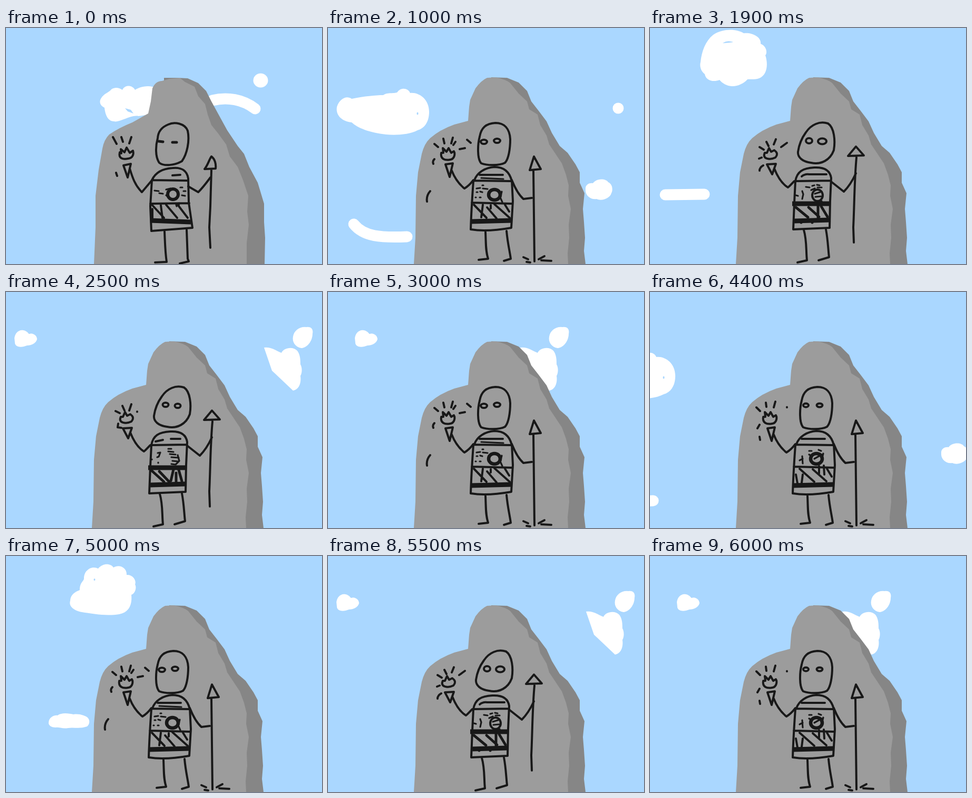
These frames come from a looping animation (600x450 px, 6.1 s). An HTML page:

```html
<!DOCTYPE html>
<html lang="en">
<head>
<meta charset="utf-8">
<title>Figure on a rock</title>
<style>
html, body { margin: 0; width: 100%; height: 100%; overflow: hidden; background: #aad7ff; }
svg { display: block; width: 600px; height: 450px; }
.cloud path, .cloud ellipse { fill: #fff; }
.cloud .line { fill: none; stroke: #fff; stroke-width: 21; stroke-linecap: round; }
.cloud .gap { fill: #aad7ff; stroke: none; }
.cloud .slit { fill: none; stroke: #aad7ff; stroke-width: 2.5; stroke-linecap: round; }
.light { fill: #9c9c9c; }
.dark { fill: #868686; }
.ink { fill: none; stroke: #181818; stroke-width: 4; stroke-linecap: round; stroke-linejoin: round; }
.thin { stroke-width: 3.2; }
.bar { stroke-width: 9; stroke-linecap: butt; }
.cloud, .rock, .pose, .detail { display: none; }
.on { display: inline; }
</style>
</head>
<body>
<svg viewBox="0 0 600 450">
  <rect width="600" height="450" fill="#aad7ff"/>

  <g class="cloud" id="near">
    <g class="l">
      <path d="M180 135C186 124 196 123 200 117C208 112 214 114 221 118C225 108 240 108 245 118C255 111 275 108 285 115L300 160L252 168C235 165 217 181 205 178C192 178 188 162 187 152C178 148 177 140 180 135Z"/>
      <path class="gap" d="M226 153L237 156L242 163L231 159Z"/>
    </g>
    <g class="r">
      <path class="line" d="M392 138C420 131 450 136 473 154"/>
      <ellipse cx="483.500" cy="100" rx="14" ry="13.500"/>
    </g>
  </g>

  <g class="cloud" id="spread">
    <g class="l">
      <path d="M58 155C62 138 78 134 88 129C95 119 110 118 116 130C128 134 140 133 147 130C155 112 178 110 187 130C190 138 190 136 200 141C214 150 218 170 214 178C205 195 175 198 150 203C120 204 100 202 85 198C62 190 54 172 58 155Z"/>
      <path class="slit" d="M100 179Q120 183 140 183M137 159L148 158M166 160L175 154"/>
      <path class="line" d="M151 397L180 394"/>
    </g>
    <g class="r">
      <path class="line" d="M568 110C552 113 540 120 536 131C538 140 546 148 552 153"/>
      <path d="M475 300C485 290 500 290 508 295C514 304 510 318 500 326C492 331 480 330 475 325Z"/>
    </g>
  </g>

  <g class="cloud" id="wide">
    <g class="l">
      <path d="M17 150C22 135 35 128 45 135C70 130 90 128 105 128C112 122 128 126 132 122C138 113 152 114 156 124C172 122 192 135 192 160C192 180 182 192 170 195C155 203 130 205 110 203C80 200 55 190 45 180C25 178 14 165 17 150Z"/>
      <ellipse class="gap" cx="170" cy="163" rx="1.500" ry="2.500"/>
      <path class="line" d="M49 374C68 398 100 400 150 398"/>
    </g>
    <g class="r">
      <ellipse cx="551" cy="153" rx="10.500" ry="10.500"/>
      <path d="M489 308C488 298 497 295 503 296C510 286 528 287 532 294C541 298 541 310 538 315C536 324 520 331 510 326C498 328 488 318 489 308Z"/>
    </g>
  </g>

  <g class="cloud" id="high">
    <g class="l">
      <path d="M96 65C98 45 105 25 120 13C140 0 165 2 178 10C195 8 212 18 210 30C222 35 223 48 219 52C225 70 222 90 207 96C198 99 190 97 185 98C178 106 165 112 155 111C145 110 138 106 132 99C120 104 106 100 104 88C96 82 94 72 96 65Z"/>
      <path class="gap" d="M138 29C145 24 153 25 158 27L150 28Z"/>
      <path class="line" d="M29 318L103 317"/>
    </g>
    <g class="r"></g>
  </g>

  <g class="cloud" id="puffy">
    <g class="l">
      <path d="M122 85C123 72 133 68 140 65C140 50 148 48 148 43C148 25 165 18 175 24C185 12 200 15 204 22C215 15 230 22 229 36C242 35 248 48 245 54C249 62 244 72 238 74C240 95 232 108 215 111C190 115 165 110 150 108C132 106 118 98 122 85Z"/>
      <ellipse class="gap" cx="168" cy="45" rx="1.500" ry="2"/>
      <path d="M81 317C82 307 92 303 98 304C105 298 120 300 128 302C140 300 150 305 152 306C160 310 160 320 154 325C140 330 128 326 118 328C108 330 100 326 95 327C85 327 80 322 81 317Z"/>
    </g>
    <g class="r"></g>
  </g>

  <g class="cloud" id="small">
    <g class="l">
      <path d="M51 88C52 78 60 71 68 73C75 74 77 79 79 80C86 77 94 83 94 90C92 98 83 102 75 102C65 106 54 106 52 98Z"/>
    </g>
    <g class="r">
      <path d="M420 85C422 72 435 65 445 67C455 65 459 72 457 80C457 92 448 106 436 107C424 105 418 95 420 85Z"/>
      <path d="M365 106C378 104 388 112 398 116C402 106 420 103 428 112C434 120 434 130 434 138C438 145 437 155 434 160C436 172 432 186 420 188L380 150Z"/>
    </g>
  </g>

  <g class="rock" id="rockA">
    <path class="dark" d="M326 95L345 96L365 105L380 120L390 140L402 162L420 195L440 225L452 240L462 265L478 295L490 335L490 370L492 400L491 450H300V95Z"/>
    <path class="light" d="M167 450L170 380L170 320L176 270L183 230Q186 213 196 203Q215 190 240 180L270 163L275 140L278 115Q284 101 296 101L310 97L330 95L340 103L358 112L365 130L378 145L383 165L390 185L402 200L418 222L425 245L440 265L450 290L460 320L458 350L461 375L457 410L457 450Z"/>
  </g>
  <g class="rock" id="rockB">
    <path class="dark" d="M310 94L340 95L362 104L378 120L386 140L400 158L415 178L425 200L440 225L455 238L470 260L478 275L478 295L487 315L484 345L486 370L488 400L486 425L489 450H300Z"/>
    <path class="light" d="M163 450L166 400L167 320L171 275L178 240Q183 220 194 210Q212 194 240 184L266 177L268 150L270 137L280 115Q291 100 302 95L318 94Q338 98 346 105L362 125L378 140L382 155L398 165L403 185L415 205L420 222L432 240L444 258L452 280L457 300L456 320L461 345L457 375L458 400L455 430L456 450Z"/>
  </g>

  <g class="pose ink" id="start">
    <path d="M288 210C289 195 298 188 308 184C320 178 340 182 345 196C349 215 344 240 334 254C320 262 300 264 291 257C283 245 284 225 288 210Z"/>
    <path d="M290 216L298 217M316 218L324 218" stroke-width="5"/>
    <path d="M277 290C284 275 298 268 316 267C334 265 344 273 346 287L347 333L354 381L276 387L274 340L277 290L346 291M316 281L331 280M274 335L348 334"/>
    <path class="bar" d="M274 367L351 370"/>
    <path d="M277 337L300 362M294 338L297 362M278 345L278 362M304 337L325 362M326 337L345 362"/>
    <ellipse cx="317" cy="317" rx="10" ry="10" stroke-width="6"/>
    <path class="thin" d="M282 310L290 311M291 315L298 316M304 308L312 306M304 319L308 322M331 304L335 304M337 311L341 311M334 319L340 320M323 337L324 340M329 334L328 338"/>
    <path d="M279 288L258 313C245 300 240 285 235 268M346 302L365 313C375 303 382 293 388 285"/>
    <path d="M223 262L237 259L231 285Z"/>
    <path d="M216 237C213 249 222 251 232 249C241 248 243 240 241 234L235 238L229 228L225 237L218 231L219 239Z"/>
    <path d="M203 208L210 221M219 208L222 217M238 208L234 220M209 276L211 282"/>
    <path d="M390 270L388 340L386 380L388 419M390 245C386 250 384 260 377 269L398 268C399 260 397 250 390 245"/>
    <path d="M301 388C302 410 302 425 305 446L283 447M343 385L345 440L347 445L330 449"/>
  </g>

  <g class="pose ink" id="upright">
    <path d="M288 207C291 190 300 182 318 181C335 181 345 192 346 212C346 230 343 250 336 257C325 263 300 262 291 258C283 250 284 222 288 207Z"/>
    <path d="M278 290C283 276 298 266 316 265C334 265 345 275 349 292M276 292C274 320 272 350 271 384C295 388 325 385 348 381L351 330L349 290M277 291L349 292M273 333L350 335M288 280L332 280"/>
    <path class="bar" d="M272 369L349 367"/>
    <path d="M276 290C270 298 264 303 259 306C248 297 240 285 235 272M349 290C355 305 362 318 371 326L387 324"/>
    <path d="M223 260L237 258L231 284Z"/>
    <path d="M215 238C213 250 222 253 232 251C240 250 242 240 239 235L234 238L229 229L225 236L218 229L219 238Z"/>
    <path d="M390 272L392 445M391 245L383 271L404 269Z"/>
    <path d="M371 437L380 441M377 446L384 447M400 441L411 435M405 443L424 444"/>
    <path d="M299 389C300 410 299 425 304 440L286 442M339 387C341 410 345 425 347 440L334 444"/>
    <ellipse cx="316" cy="318" rx="11" ry="10" stroke-width="6.500"/>
    <g class="detail">
      <ellipse cx="296" cy="216" rx="5" ry="3.500"/><ellipse cx="322" cy="216" rx="5.500" ry="3.500"/>
      <path d="M202 220L209 227M220 211L221 219M238 209L235 220M208 253L204 260M208 276L209 282M260 219.500V220"/>
      <path class="thin" d="M284 321L290 318M289 313L290 327M302 303L307 303M320 301L325 303M302 310L306 312M329 308L328 312M312 318L326 310"/>
      <path d="M277 348L280 365M290 348L288 364M284 337L312 362M309 338L335 361M321 332L321 346M330 331L331 348M336 337L345 352"/>
    </g>
    <g class="detail">
      <ellipse cx="296" cy="217" rx="6" ry="4"/><ellipse cx="321" cy="215" rx="6" ry="4"/>
      <path d="M202 221L209 227M219 211L221 220M237 209L234 220M242 217L238 223M250 231L260 229M264 213L271 219M202 250Q198 254 200 259M194 311C188 318 187 325 188 331"/>
      <path class="thin" d="M291 286L333 288M293 300L295 300M282 306L289 305M294 306L303 307M282 313L284 313M289 312L293 313M280 323L281 323M288 323L290 323M327 323L331 332M330 312L328 320"/>
      <path d="M277 337L301 362M294 337L291 361M302 342L320 363M316 336L345 362M309 338L309 344M336 337L344 350M305 369L314 369"/>
    </g>
  </g>

  <g class="pose ink" id="lean">
    <path d="M296 199C306 184 322 177 338 182C350 190 352 215 349 233C342 252 325 261 306 257C290 255 280 247 281 236C283 222 288 210 296 199Z"/>
    <path d="M276 292C279 274 290 267 312 266C332 265 342 272 344 286L342 330L341 381L272 384L274 333L276 292L343 291"/>
    <path class="bar" d="M270 335L342 335M274 368L341 366" stroke-width="8"/>
    <path d="M274 292C268 298 266 301 262 304C250 297 242 283 236 268M344 293L368 312C378 302 386 288 391 277"/>
    <path d="M222 260L239 259L232 279Z"/>
    <path d="M218 238C212 250 228 252 238 247C244 240 240 236 236 233L230 236L226 229L222 238Z"/>
    <path d="M392 247C388 290 388 340 386 380L387 409M391 226L376 244L406 243Z"/>
    <path d="M292 385C298 405 296 425 298 443L280 447M334 384C338 405 338 420 340 437L320 443"/>
    <g class="detail">
      <ellipse cx="302" cy="215" rx="6" ry="5"/><ellipse cx="327" cy="216" rx="8" ry="5.500"/>
      <path d="M221 217L225 225M239 212L235 222M208 227L216 232M249 227L260 219M207 249L212 247M215 262Q208 266 208 272"/>
      <path d="M288 283Q294 278 302 279L335 279"/>
      <ellipse cx="318" cy="319" rx="10" ry="11"/>
      <path class="thin" d="M277 319L281 320M289 311L291 317L289 326M296 303L303 304M308 301L312 300M317 299L322 300M318 304L326 304M306 309L313 306M313 316L326 312M314 322L325 321M314 332L326 330"/>
      <path d="M277 342L300 361M301 342L321 360M319 334L319 361M325 340L337 360M287 368V371M308 368V371" stroke-width="5"/>
    </g>
    <g class="detail">
      <ellipse cx="303" cy="215" rx="5.500" ry="4"/><ellipse cx="326" cy="217" rx="5.500" ry="4"/>
      <path d="M221 217L225 226M238 214L234 226M208 227L216 231M213 251L212 258L219 259M249 228V228.500"/>
      <path d="M284 285L298 282M313 280L331 280"/>
      <path class="thin" d="M277 319V319.500M288 307L293 306L290 314L287 315M289 325V326M308 299L314 299M308 304L318 305M311 309L322 310M314 315L328 316M326 311L329 322L322 329L314 328M316 322L326 323"/>
      <path d="M277 341L300 362M291 342L310 362M319 334L313 360M327 336L334 361M323 345V362" stroke-width="5"/>
    </g>
  </g>
</svg>

<script>
const $ = id => document.getElementById(id);
const show = (el, on) => el.classList.toggle('on', on);
const LOOP = 6100, STEP = 100, INTRO = 4;

// id, first step, last step, step at rest, drift per step of the left and right side
const skies = [
  ['small', 0, 1, 0, 0, 0],
  ['near', 2, 6, 4, -22, 14],
  ['spread', 7, 9, 8, -18, 10],
  ['wide', 10, 15, 10, -36, 16],
  ['high', 16, 19, 19, 25, 0],
  ['puffy', 20, 24, 20, 8, 0],
  ['small', 25, 29, 30, 7, -25]
];
const clouds = document.querySelectorAll('.cloud');

function slide(group, side, x) {
  group.querySelector(side).setAttribute('transform', `translate(${x} 0)`);
}

function drawSky(n) {
  const k = n < INTRO ? 4 : n % 30;
  const [id, , , rest, left, right] = skies.find(s => k >= s[1] && k <= s[2]);
  const group = $(id);
  const d = id === 'near' ? Math.max(0, k - rest) : k - rest;
  clouds.forEach(c => show(c, c === group));
  slide(group, '.l', d * left);
  slide(group, '.r', d * right);
}

function drawFigure(n) {
  const intro = n < INTRO;
  const leaning = n % 10 >= 5;
  const variant = (n + Math.floor(n / 10)) % 2;
  show($('rockA'), intro);
  show($('rockB'), !intro);
  show($('start'), intro);
  show($('upright'), !intro && !leaning);
  show($('lean'), !intro && leaning);
  for (const id of ['upright', 'lean'])
    $(id).querySelectorAll('.detail').forEach((g, i) => show(g, i === variant));
}

const begin = performance.now();
let last = -1;
function tick() {
  const n = Math.floor((performance.now() - begin) % LOOP / STEP);
  if (n !== last) {
    drawSky(n);
    drawFigure(n);
    last = n;
  }
  requestAnimationFrame(tick);
}
tick();
</script>
</body>
</html>
```
